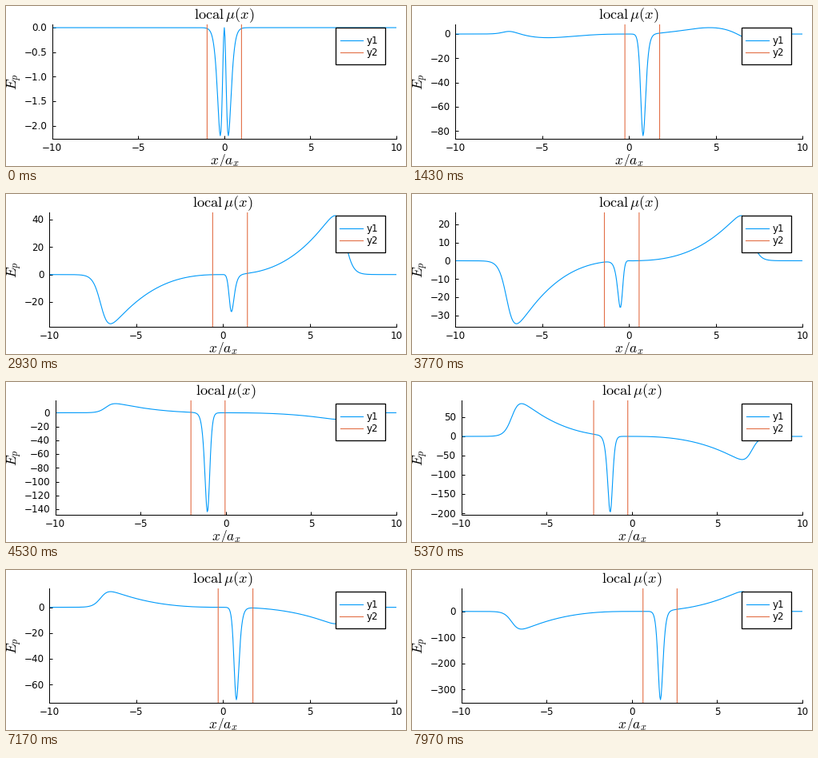
These frames come from a looping animation (500x200 px, 8 s). A matplotlib script:

```python
import math

import numpy as np
import matplotlib.pyplot as plt
from matplotlib.animation import FuncAnimation
from matplotlib.patches import Rectangle

W, H = 500, 200
FRAMES = 240
TOP, BOTTOM, RIGHT = 23, 166.2, 488
FONT = 11.9  # pixels
BLUE, ORANGE = "#009AFA", "#E36F47"
PT = 0.72  # points per pixel at 100 dpi

plt.rcParams["font.family"] = "DejaVu Sans"
plt.rcParams["mathtext.fontset"] = "cm"

x = 10 * (np.arange(513) / 256 - 1)
r = np.abs(x)

# envelope of the outer waves on each side
KNOTS = [0, 43, 88, 113, 161, 190, 239]
LEFT_AMP = [0, 12, 36, 60, 95, 87, 102]
RIGHT_AMP = [0, 21, 43, 43, 67, 84, 114]


def center(n):
    """Position of the growing oscillation."""
    amp = 0.63 + 0.0036 * n + 4.5e-6 * n * n
    drift = 0.03 * math.sin(math.pi * n / 200) ** 2
    return amp * math.sin(math.pi * n / 100) + drift


def profile(n):
    well = -133 * (1 - 0.0003 * n) * x**2 / np.cosh(5.15 * (x - center(n))) ** 2
    lead = 0.7 * (6.2 - r) * math.exp(-((n / 52) ** 2))
    phase = 0.0355 * (n - 41.6) + lead
    amp = np.where(x < 0, -np.interp(n, KNOTS, LEFT_AMP),
                   np.interp(n, KNOTS, RIGHT_AMP))
    edge = 1.12 / (1 + np.exp((r - 6.98) / 0.22))
    return well + amp * np.sin(phase) * (r / 6.5) ** 2.6 * edge


def tick_step(lo, hi):
    """Largest 1-2-5 step that leaves at least four ticks."""
    for e in range(3, -4, -1):
        for m in (5, 2, 1):
            step = m * 10.0**e
            if math.floor(hi / step) - math.ceil(lo / step) >= 3:
                return step
    return 0.001


def tick_labels(lo, hi):
    step = tick_step(lo, hi)
    digits = max(0, -math.floor(math.log10(step) + 1e-9))
    ids = range(math.ceil(lo / step), math.floor(hi / step) + 1)
    values = [i * step for i in ids]
    return values, [f"{v:.{digits}f}".replace("-", "\u2212") for v in values]


def text_em(s):
    widths = {"\u2212": 0.838, ".": 0.318}
    return sum(widths.get(ch, 0.636) for ch in s)


fig = plt.figure(figsize=(W / 100, H / 100), dpi=100, facecolor="white")
ax = fig.add_axes([0.1, 0.1, 0.8, 0.8])
ax.set_xlim(-10, 10)
ax.set_xticks([-10, -5, 0, 5, 10])
ax.patch.set_visible(False)
ax.tick_params(direction="in", length=4 * PT, width=PT,
               labelleft=False, labelbottom=False)
for side in ("top", "right"):
    ax.spines[side].set_visible(False)
for side in ("left", "bottom"):
    ax.spines[side].set_linewidth(PT)

curve, = ax.plot([], [], color=BLUE, lw=0.8)
walls = [ax.plot([], [], color=ORANGE, lw=0.8, snap=False)[0] for _ in range(2)]

# pixel-space layer for labels and legend
top = fig.add_axes([0, 0, 1, 1])
top.set_xlim(0, W)
top.set_ylim(H, 0)
top.axis("off")


def label(px, py, s="", size=FONT, ha="center", **kw):
    return top.text(px, py, s, fontsize=size * PT, ha=ha, va="baseline", **kw)


title = label(0, 16, r"$\mathrm{local}\,\mu(x)$", 18.4)
xlabel = label(0, 198.3, r"$x/a_x$", 17.6)
label(13.7, 95, r"$E_p$", 17.4, rotation=90, rotation_mode="anchor")
xlabels = [label(0, 181, s) for s in ("\u221210", "\u22125", "0", "5", "10")]
ylabels = [label(0, 0, ha="right") for _ in range(12)]

box = Rectangle((0, 27.2), 1, 45.6, fc="white", ec="black", lw=1.3 * PT,
                zorder=2)
top.add_patch(box)
keys = []
for name, color, py in (("y1", BLUE, 43), ("y2", ORANGE, 58)):
    line, = top.plot([], [], color=color, lw=0.8, zorder=3)
    keys.append((line, label(0, py + 4, name, ha="left", zorder=3), py))


def draw(n):
    y = profile(n)
    pad = 0.03 * (y.max() - y.min())
    lo, hi = y.min() - pad, y.max() + pad
    values, names = tick_labels(lo, hi)
    left = 28.9 + FONT * max(text_em(s) for s in names)
    width = RIGHT - left

    ax.set_position([left / W, 1 - BOTTOM / H, width / W, (BOTTOM - TOP) / H])
    ax.set_ylim(lo, hi)
    ax.set_yticks(values)
    curve.set_data(x, y)
    c = center(n)
    for wall, dx in zip(walls, (-1, 1)):
        wall.set_data([c + dx, c + dx], [lo, hi])

    mid = left + width / 2
    title.set_x(mid)
    xlabel.set_x(mid)
    for i, t in enumerate(xlabels):
        t.set_x(left + width * i / 4)
    for t in ylabels:
        t.set_text("")
    for t, v, s in zip(ylabels, values, names):
        py = BOTTOM - (v - lo) / (hi - lo) * (BOTTOM - TOP)
        t.set_position((left - 6.5, py + 4.3))
        t.set_text(s)

    end = RIGHT - width / 30
    start = end - 47.2 - width / 30
    box.set_x(start)
    box.set_width(end - start)
    for line, t, py in keys:
        line.set_data([start + 5.5, start + 34], [py, py])
        t.set_x(start + 38.3)
    return []


anim = FuncAnimation(fig, draw, frames=FRAMES, interval=8000 / FRAMES,
                     repeat=True, repeat_delay=0, blit=False)
plt.show()
```
